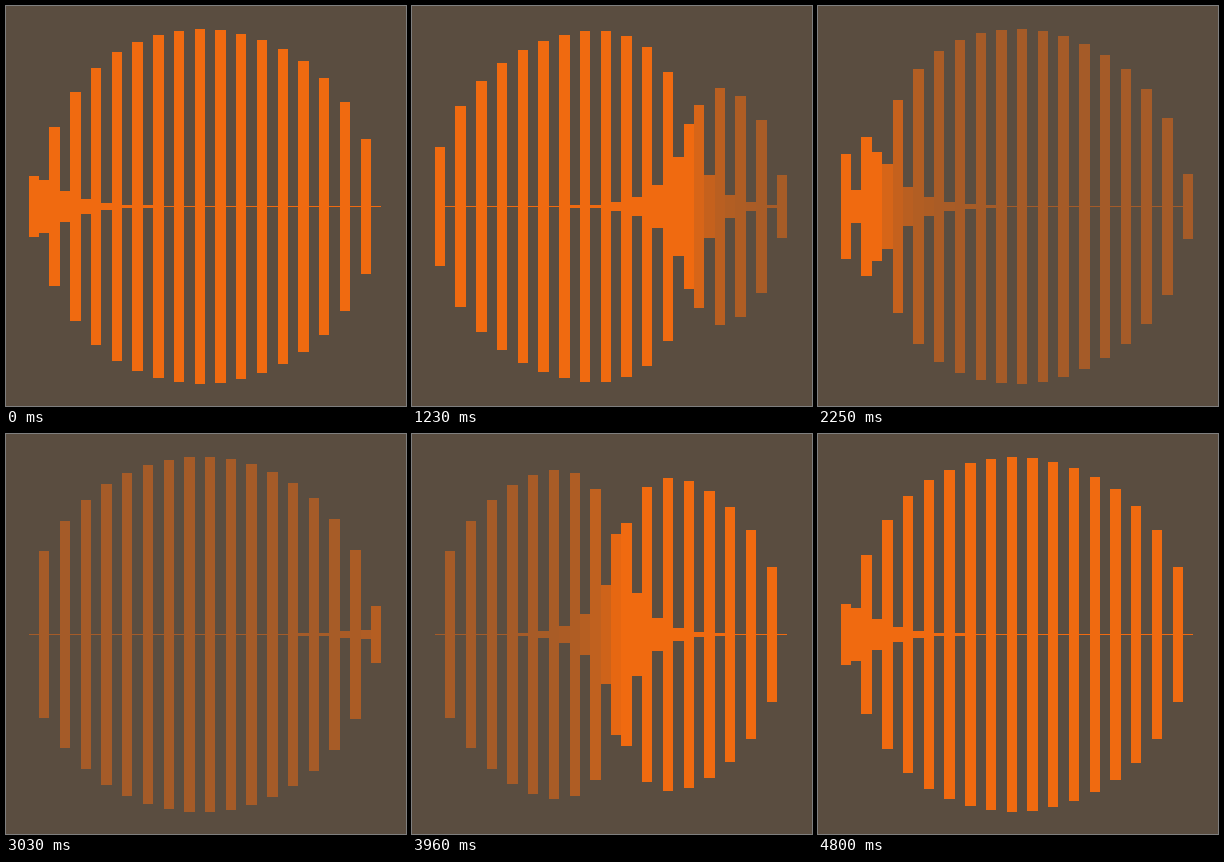
An HTML page with a canvas for the animation above (4830 ms loop, 400 by 400 pixels).

```html
<!DOCTYPE html>
<html lang="en">
<head>
<meta charset="utf-8">
<title>Bar circle wave</title>
<style>
  html, body { margin: 0; height: 100%; overflow: hidden; background: #5a4d40; }
  canvas { display: block; }
</style>
</head>
<body>
<canvas id="stage" width="400" height="400"></canvas>
<script>
const ctx = document.getElementById('stage').getContext('2d');
const BARS = 34, RADIUS = 177.5, MIDDLE = 200.5;
const LOOP = 4830, STEP = 30, CYCLE = 4800, HALF = CYCLE / 2;
const SWEEP = 1650, DURATION = 1500;

function expoInOut(u) {
  if (u <= 0) return 0;
  if (u >= 1) return 1;
  return u < 0.5 ? 2 ** (20 * u - 11) : 1 - 2 ** (9 - 20 * u);
}

const edge = i => Math.round(22.7 + i * 10.37);
const chord = i => Math.sqrt(RADIUS ** 2 - (i * 10.355 - 167.15) ** 2);

// 1 while the even bars stand tall and bright, 0 while the odd bars stand tall and dim
function evenShare(i, time) {
  const delay = SWEEP * (1 - i / BARS);
  const local = (time - delay + CYCLE) % CYCLE;
  const eased = expoInOut((local % HALF) / DURATION);
  return local < HALF ? 1 - eased : eased;
}

function draw(time) {
  ctx.globalAlpha = 1;
  ctx.fillStyle = '#5a4d40';
  ctx.fillRect(0, 0, 400, 400);
  ctx.fillStyle = '#f06a10';
  for (let i = 0; i < BARS; i++) {
    const even = evenShare(i, time);
    const share = i % 2 ? 1 - even : even;
    const half = 0.5 + share * (chord(i) - 0.5);
    const top = Math.round(MIDDLE - half);
    ctx.globalAlpha = Math.min(1, 0.5 + even);
    ctx.fillRect(edge(i), top, edge(i + 1) - edge(i), 2 * (MIDDLE - top));
  }
}

function tick() {
  const time = performance.now() % LOOP;
  draw(Math.floor(time / STEP) * STEP % CYCLE);
  requestAnimationFrame(tick);
}
tick();
</script>
</body>
</html>
```
